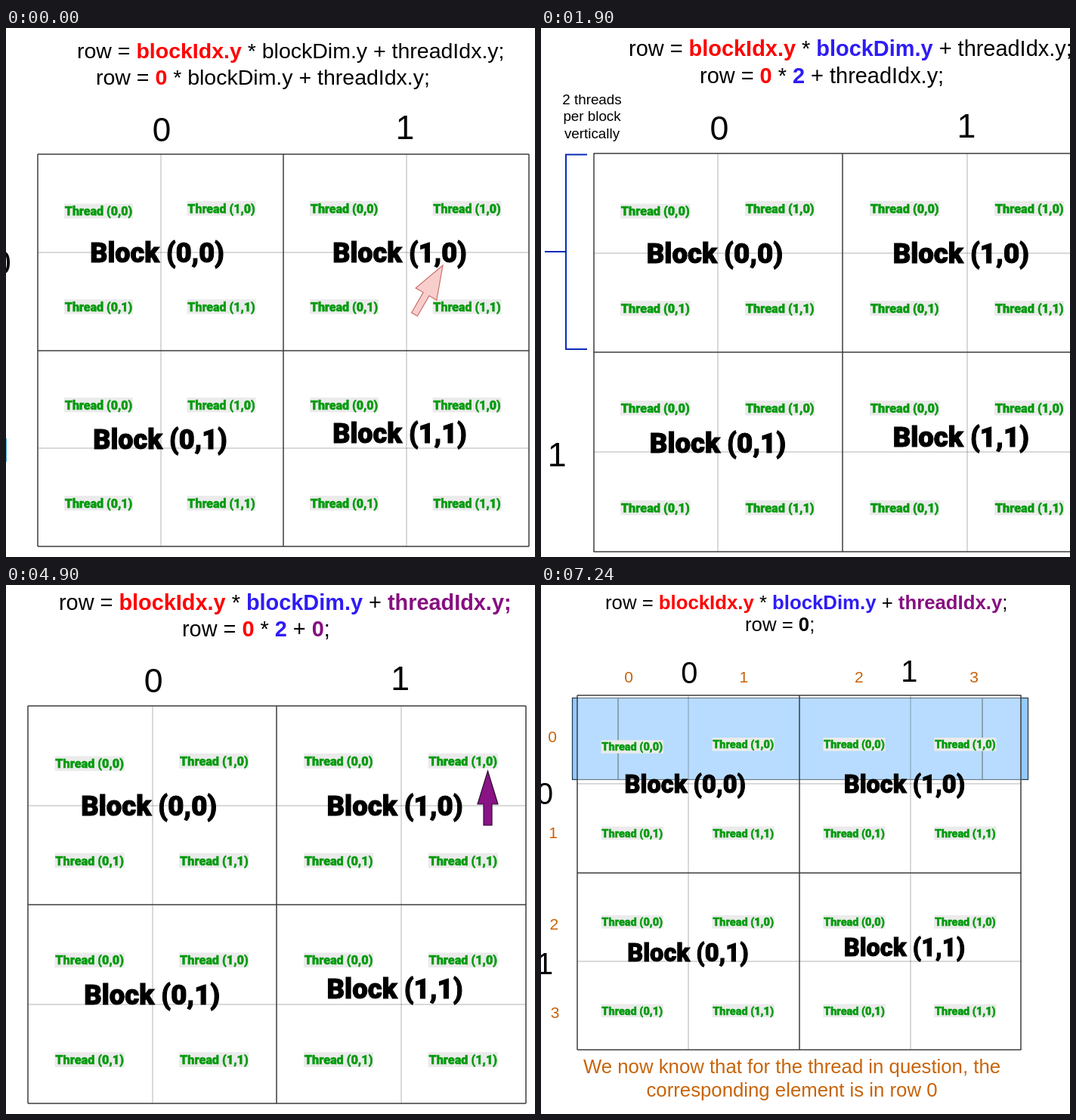
An HTML page with a canvas for the animation above (8000 ms loop, 700x700 px).

```html
<!DOCTYPE html>
<html lang="en">
<head>
<meta charset="utf-8">
<title>Row index of a thread</title>
<style>
  html, body { margin: 0; width: 100%; height: 100%; overflow: hidden; background: #fff; }
  canvas { display: block; }
</style>
</head>
<body>
<canvas id="stage" width="700" height="700"></canvas>
<script>
const ctx = document.getElementById('stage').getContext('2d');
const LOOP = 8000, WIDTH = 650, HEIGHT = 519, FORMULA_SIZE = 28.5;
const SANS = '"Liberation Sans", Arial, sans-serif';
const COLORS = { r: '#ff0000', b: '#2e1cf5', p: '#870f80', k: '#000' };
const ORANGE = '#c8640a', INK = '#25384c';

// x, y: top left corner of the grid. lines: [x, baseline, formula],
// where {r:text} is bold in the colour r.
const slides = [
  { start: 0, x: 42, y: 167, scale: 1, rows: [0], over: pointAtBlock, lines: [
    [94, 40, 'row = {r:blockIdx.y} * blockDim.y + threadIdx.y;'],
    [119, 75, 'row = {r:0} * blockDim.y + threadIdx.y;']] },
  { start: 100, x: 69.5, y: 166, scale: 1.0153, rows: [1], over: bracket, lines: [
    [116, 37, 'row = {r:blockIdx.y} * {b:blockDim.y} + threadIdx.y;'],
    [210, 73, 'row = {r:0} * {b:2} + threadIdx.y;']] },
  { start: 3100, x: 29, y: 160, scale: 1.0137, rows: [], over: pointAtThread, lines: [
    [70, 33, 'row = {r:blockIdx.y} * {b:blockDim.y} + {p:threadIdx.y;}'],
    [233, 68, 'row = {r:0} * {b:2} + {p:0};']] },
  { start: 6100, x: 48, y: 146, scale: 0.9037, rows: [0, 1], under: rowBand, over: globalIndices, lines: [
    [85, 32, 'row = {r:blockIdx.y} * {b:blockDim.y} + {p:threadIdx.y};'],
    [270, 61, 'row = {k:0};']] }
];

function repeat(count, draw) {
  for (let i = 0; i < count; i++) draw(i);
}

function label(text, x, y, size, color = '#000') {
  ctx.font = `${size}px ${SANS}`;
  ctx.textAlign = 'center';
  ctx.fillStyle = color;
  ctx.fillText(text, x, y + size * 0.355);
}

function heavyLabel(text, x, y, size, color) {
  ctx.font = `900 ${size}px Roboto, sans-serif`;
  ctx.textAlign = 'center';
  ctx.fillStyle = ctx.strokeStyle = color;
  ctx.lineWidth = size * 0.03;
  ctx.fillText(text, x, y + size * 0.355);
  ctx.strokeText(text, x, y + size * 0.355);
}

function formula(x, y, source, size) {
  ctx.textAlign = 'left';
  for (const [, color, bold, plain] of source.matchAll(/\{(\w):(.*?)\}|([^{]+)/g)) {
    ctx.font = `${bold ? 700 : 400} ${size}px ${SANS}`;
    ctx.fillStyle = COLORS[color] || '#000';
    ctx.fillText(bold || plain, x, y);
    x += ctx.measureText(bold || plain).width;
  }
}

function line(x1, y1, x2, y2, color, width) {
  ctx.beginPath();
  ctx.moveTo(x1, y1);
  ctx.lineTo(x2, y2);
  ctx.strokeStyle = color;
  ctx.lineWidth = width;
  ctx.stroke();
}

// Upward arrow with its tip at x, y, turned clockwise by angle.
function arrow(x, y, angle, head, shaft, length, fill, stroke) {
  const neck = 44;
  ctx.save();
  ctx.translate(x, y);
  ctx.rotate(angle);
  ctx.beginPath();
  ctx.moveTo(0, 0);
  ctx.lineTo(head, neck);
  ctx.lineTo(shaft, neck);
  ctx.lineTo(shaft, length);
  ctx.lineTo(-shaft, length);
  ctx.lineTo(-shaft, neck);
  ctx.lineTo(-head, neck);
  ctx.closePath();
  ctx.fillStyle = fill;
  ctx.fill();
  ctx.strokeStyle = stroke;
  ctx.lineWidth = 1.2;
  ctx.stroke();
  ctx.restore();
}

function gridLines({ x, y, scale }) {
  const rules = (first, step, count, color, width) => repeat(count, i => {
    const part = first + i * step;
    const px = Math.round(x + part * WIDTH * scale), py = Math.round(y + part * HEIGHT * scale);
    line(px, y, px, y + HEIGHT * scale, color, width);
    line(x, py, x + WIDTH * scale, py, color, width);
  });
  rules(0.25, 0.5, 2, 'rgba(0,0,0,.2)', 1.5);
  rules(0, 0.5, 3, '#3c3c3c', 1.5);
}

function gridText({ x, y, scale, rows }) {
  ctx.save();
  ctx.translate(x, y);
  ctx.scale(scale, scale);
  repeat(2, i => label(i, 164 + 322 * i, -33 - 3 * i, 44));
  rows.forEach(r => label(r, -47.5, 143.5 + 249 * r, 44));

  repeat(4, j => repeat(4, i => {
    const cx = 80.5 + 162.5 * i, cy = (i + j ? 72 : 75.5) + 130 * j;
    ctx.fillStyle = '#ebebeb';
    ctx.fillRect(cx - 45.5, cy - 10, 91, 19.5);
    heavyLabel(`Thread (${i % 2},${j % 2})`, cx, cy, 16, '#009a0c');
  }));
  repeat(2, j => repeat(2, i =>
    heavyLabel(`Block (${i},${j})`, 158 + 321 * i + 4 * j * (1 - i), 130 + j * (247 - 8 * i), 36, '#000')));
  ctx.restore();
}

function pointAtBlock() {
  arrow(578, 314, Math.PI / 6, 16, 4.5, 75, '#f8cecc', '#cc6f68');
  ctx.fillStyle = '#45b4e6';
  ctx.fillRect(0, 543, 1, 31);
}

function pointAtThread() {
  arrow(637.5, 246, 0, 13.5, 5.5, 72, '#8a1386', '#2b1030');
}

function bracket() {
  ctx.strokeStyle = '#0a2ab8';
  ctx.lineWidth = 2;
  ctx.stroke(new Path2D('M61 167.5H33V425H61M5 296H33'));
  ['2 threads', 'per block', 'vertically'].forEach((text, i) => label(text, 67.5, 94 + i * 22.5, 18.8));
}

function rowBand() {
  ctx.fillStyle = '#94caff';
  ctx.fillRect(41.5, 149.5, 603, 108);
  ctx.strokeStyle = INK;
  ctx.lineWidth = 1.2;
  ctx.strokeRect(41.5, 149.5, 603, 108);
  for (const x of [102, 584]) line(x, 149, x, 258, INK, 1.2);
  ctx.fillStyle = 'rgba(255,255,255,.33)';
  ctx.fillRect(48, 146, 588, 468);
}

function globalIndices({ scale }) {
  repeat(4, i => {
    label(i, 116 + 152.4 * i, 122, 21, ORANGE);
    label(i, 15 + 1.2 * i, 201 + i * (129 - 2.5 * i), 21, ORANGE);
  });
  ['We now know that for the thread in question, the', 'corresponding element is in row 0']
    .forEach((text, i) => label(text, 332, 637 + 31 * i, FORMULA_SIZE * scale, ORANGE));
}

function draw(time) {
  const slide = slides.findLast(s => s.start <= time);
  ctx.fillStyle = '#fff';
  ctx.fillRect(0, 0, 700, 700);
  slide.under?.();
  gridLines(slide);
  gridText(slide);
  for (const [x, y, source] of slide.lines) formula(x, y, source, FORMULA_SIZE * slide.scale);
  slide.over(slide);
}

const begin = performance.now();
function tick() {
  draw((performance.now() - begin) % LOOP);
  requestAnimationFrame(tick);
}
tick();
</script>
</body>
</html>
```
